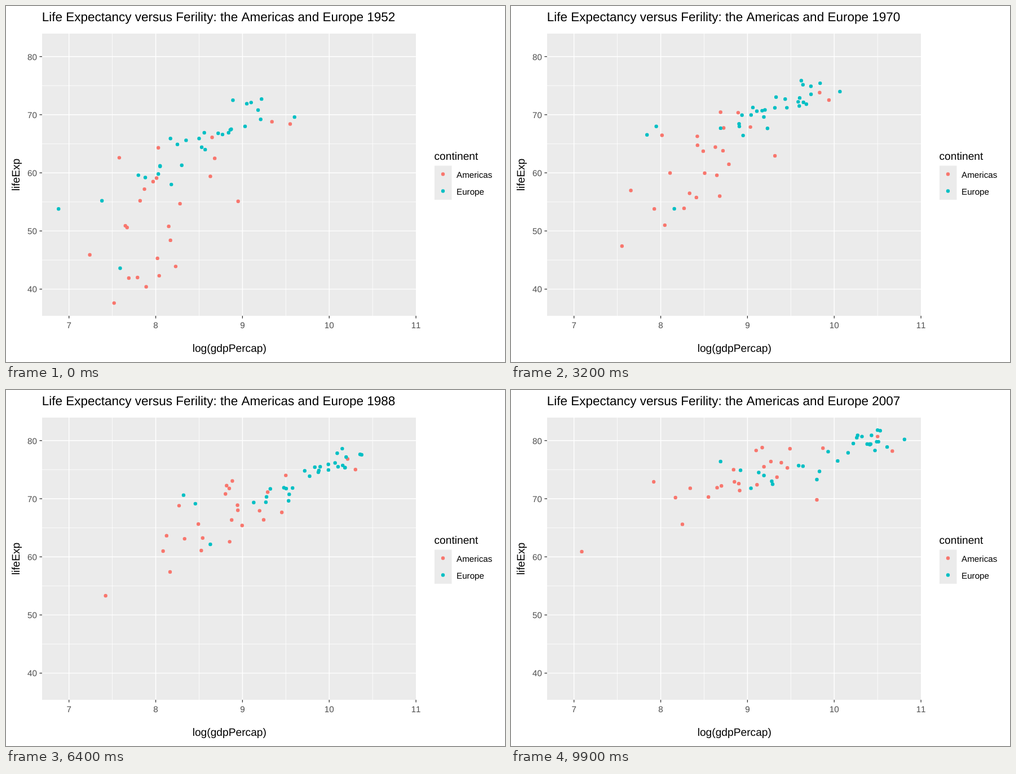
An HTML page for the animation above (10000 ms loop, 885x632 px).

```html
<!DOCTYPE html>
<html lang="en">
<head>
<meta charset="utf-8">
<title>Life expectancy and income</title>
<style>
  html, body { margin: 0; width: 885px; height: 632px; overflow: hidden; background: #fff; }
  svg { display: block; }
  text {
    font-family: "Liberation Sans", Arial, sans-serif;
    font-size: 19.2px;
    font-kerning: none;
    text-rendering: geometricPrecision;
  }
  .title { font-size: 22.5px; }
  .tick, .label { font-size: 15.2px; }
  .tick { fill: #4d4d4d; }
</style>
</head>
<body>
<svg id="chart" width="885" height="632" viewBox="0 0 885 632"></svg>
<script>
const LOOP = 10000, STEP = 100, FRAMES = 100;
const FIRST = 1952, MIDDLE = 1977, LAST = 2007;
const PANEL = { left: 64, top: 49, right: 727, bottom: 550 };
const CORAL = '#F8766D', TEAL = '#00BFC4', GREY = '#EBEBEB', DARK = '#333333';

const chart = document.getElementById('chart');
const px = logGdp => 111.7 + (logGdp - 7) * 153.85;
const py = life => 89.8 + (80 - life) * 10.32;

function add(tag, attrs, content) {
  const node = document.createElementNS('http://www.w3.org/2000/svg', tag);
  for (const key in attrs) node.setAttribute(key, attrs[key]);
  if (content) node.textContent = content;
  return chart.appendChild(node);
}
const line = (x1, y1, x2, y2, stroke, width) =>
  add('line', { x1, y1, x2, y2, stroke, 'stroke-width': width });
const rect = (x, y, width, height, fill) => add('rect', { x, y, width, height, fill });
const text = (x, y, content, cls = '', anchor = 'start') =>
  add('text', { x, y, class: cls, 'text-anchor': anchor }, content);
const circle = (cx, cy, fill) => add('circle', { cx, cy, r: 3.2, fill });

function drawAxes() {
  const { left, top, right, bottom } = PANEL;
  rect(left, top, right - left, bottom - top, GREY);
  for (let v = 7.5; v < 11; v++) line(px(v), top, px(v), bottom, '#fff', 0.8);
  for (let v = 45; v < 80; v += 10) line(left, py(v), right, py(v), '#fff', 0.8);
  for (let v = 7; v <= 11; v++) {
    if (v < 11) line(px(v), top, px(v), bottom, '#fff', 1.4);
    line(px(v), bottom, px(v), bottom + 4.6, DARK, 1.3);
    text(px(v), 571.5, v, 'tick', 'middle');
  }
  for (let v = 40; v <= 80; v += 10) {
    line(left, py(v), right, py(v), '#fff', 1.4);
    line(left - 4.6, py(v), left, py(v), DARK, 1.3);
    text(55, py(v) + 5.8, v, 'tick', 'end');
  }
  text(396.3, 614, 'log(gdpPercap)', '', 'middle');
  text(0, 0, 'lifeExp', '', 'middle').setAttribute('transform', 'translate(24 299.5) rotate(-90)');
}

function drawLegend() {
  text(759.5, 272.5, 'continent');
  rect(760, 283.5, 30.5, 60.5, GREY);
  [['Americas', CORAL], ['Europe', TEAL]].forEach(([name, color], i) => {
    circle(775, 298.5 + 30 * i, color);
    text(799, 304.5 + 30 * i, name, 'label');
  });
}

drawAxes();
drawLegend();
const title = text(63.7, 27, '', 'title');

// Dots of a group share how early life expectancy rises and how deep income slumps.
// Each dot: log income at the first, middle and last year, then first and last life expectancy.
const groups = [
  { color: CORAL, early: 0.25, slump: 0, dots: [
    [8.68, 9.15, 9.46, 62.5, 75.3], [7.89, 8.1, 8.25, 40.4, 65.6], [7.65, 8.75, 9.11, 50.9, 72.4],
    [9.34, 10, 10.5, 68.8, 80.7], [8.28, 8.55, 9.49, 54.7, 78.6], [7.67, 8.27, 8.85, 50.6, 72.9],
    [7.87, 8.61, 9.17, 57.2, 78.8], [7.24, 7.84, 8.7, 45.9, 72.2], [8.17, 8.77, 8.84, 48.4, 75],
    [8.02, 8.43, 8.65, 45.3, 71.9], [7.79, 8.4, 8.55, 42, 70.3], [7.52, 7.52, 7.09, 37.6, 60.9],
    [7.69, 8, 8.17, 41.9, 70.2], [7.97, 8.8, 8.9, 58.5, 72.6], [8.15, 8.98, 9.39, 50.8, 76.2],
    [7.82, 8.7, 9.19, 55.2, 75.5], [7.58, 8.14, 8.34, 62.6, 71.8], [8.03, 9.17, 9.87, 64.3, 78.7],
    [9.55, 10.09, 10.67, 68.4, 78.2], [8.65, 8.75, 9.27, 66.1, 76.4], [8.95, 9.4, 9.34, 55.1, 73.7]
  ] },
  { color: CORAL, early: 0.3, slump: 0.52, dots: [
    [8.63, 8.78, 9.1, 59.4, 78.3], [8.04, 8.45, 7.92, 42.3, 72.9],
    [8.23, 8.8, 8.91, 43.9, 71.4], [8.01, 8.97, 9.8, 59.1, 69.8]
  ] },
  { color: TEAL, early: 0.1, slump: 0, dots: [
    [8.72, 9.87, 10.49, 66.8, 79.8], [9.03, 9.85, 10.42, 68, 79.4], [9.18, 9.92, 10.47, 70.8, 78.3],
    [8.77, 9.69, 10.41, 66.6, 79.3], [8.86, 9.81, 10.32, 67.4, 80.7], [8.87, 9.92, 10.38, 67.5, 79.4],
    [8.17, 9.52, 10.22, 65.9, 79.5], [8.89, 9.86, 10.5, 72.5, 81.8], [8.56, 9.31, 10.61, 66.9, 78.9],
    [8.5, 9.58, 10.26, 65.9, 80.5], [9.1, 9.94, 10.51, 72.1, 79.8], [9.22, 10.06, 10.81, 72.7, 80.2],
    [8.03, 9.24, 9.93, 59.8, 78.1], [8.25, 9.47, 10.27, 64.9, 80.9], [9.05, 9.84, 10.43, 71.9, 80.9],
    [9.6, 10.21, 10.53, 69.6, 81.7], [7.59, 8.36, 9.04, 43.6, 71.8], [9.21, 9.76, 10.41, 69.2, 79.4]
  ] },
  { color: TEAL, early: 0.72, slump: 0.52, dots: [
    [7.38, 8.14, 8.69, 55.2, 76.4], [6.88, 8.15, 8.92, 53.8, 74.9], [7.8, 8.94, 9.28, 59.6, 73],
    [8.05, 9.31, 9.59, 61.2, 75.7], [8.84, 9.62, 10.04, 66.9, 76.5], [8.57, 9.38, 9.8, 64, 73.3],
    [7.88, 9.15, 9.13, 59.2, 74.5], [8.3, 9.14, 9.64, 61.3, 75.6], [8.05, 9.13, 9.29, 61.1, 72.5],
    [8.18, 9.46, 9.19, 58, 74], [8.53, 9.3, 9.83, 64.4, 74.7], [8.35, 9.62, 10.16, 65.6, 77.9]
  ] }
];
for (const group of groups) {
  group.nodes = group.dots.map(() => circle(0, 0, group.color));
}

const lerp = (a, b, u) => a + (b - a) * u;

// A parabola through three values of log income.
function incomeAt(start, middle, end, u) {
  const m = (MIDDLE - FIRST) / (LAST - FIRST);
  const bulge = (middle - lerp(start, end, m)) / (m * (1 - m));
  return lerp(start, end, u) + bulge * u * (1 - u);
}

// Falls from 1987 to 1992, then recovers slowly.
const slumpAt = year => Math.max(0, Math.min((year - 1987) / 5, (LAST - year) / 15));

function draw() {
  const frame = Math.floor(performance.now() % LOOP / STEP);
  const u = frame / (FRAMES - 1);
  const year = lerp(FIRST, LAST, u);
  const lead = Math.sin(Math.PI * u) * (1 - u) ** 2;
  title.textContent =
    `Life Expectancy versus Ferility: the Americas and Europe ${Math.round(year)}`;
  for (const { dots, nodes, early, slump } of groups) {
    dots.forEach(([start, middle, end, lifeStart, lifeEnd], i) => {
      const income = incomeAt(start, middle, end, u) - slump * slumpAt(year);
      const life = lerp(lifeStart, lifeEnd, u + early * lead);
      nodes[i].setAttribute('cx', px(income));
      nodes[i].setAttribute('cy', py(life));
    });
  }
  requestAnimationFrame(draw);
}
draw();
</script>
</body>
</html>
```
